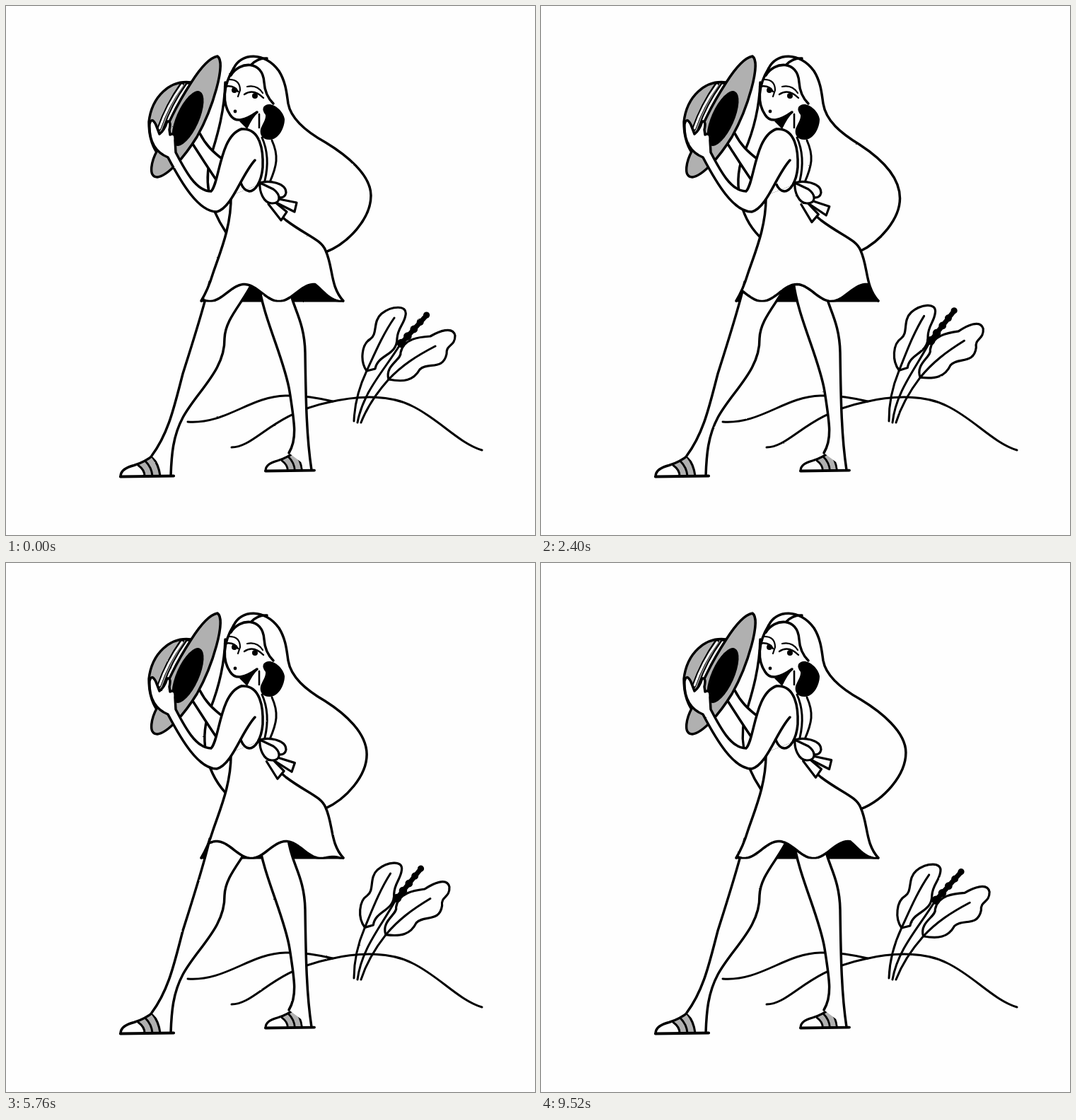
Write an HTML page that moves like this. It is 748 by 748 pixels and loops after 9.6 s.

```html
<!DOCTYPE html>
<html lang="en">
<head>
<meta charset="utf-8">
<title>Windy walk</title>
<style>
html, body { margin: 0; width: 100%; height: 100%; overflow: hidden; background: #fefefe; }
svg { display: block; width: 100vw; height: 100vh; }
</style>
</head>
<body>
<svg viewBox="0 0 748 748">
  <defs>
    <filter id="rough" filterUnits="userSpaceOnUse" x="140" y="50" width="560" height="640" color-interpolation-filters="sRGB">
      <feTurbulence id="grain" type="fractalNoise" baseFrequency="0.4" numOctaves="1" result="n"/>
      <feDisplacementMap in="SourceGraphic" in2="n" scale="1.6" xChannelSelector="R" yChannelSelector="G"/>
    </filter>
    <clipPath id="skirtClip"><path id="clipShape"/></clipPath>
  </defs>
  <g id="art" filter="url(#rough)" fill="none" stroke="#000" stroke-width="3.5" stroke-linecap="round" stroke-linejoin="round"></g>
</svg>
<script>
const INK = '#000', PAPER = '#fefefe', GRAY = '#b0b0b0';
const LOOP = 9600, STEP = 80, SWAY = 3200, TAU = 2 * Math.PI;
const $ = id => document.getElementById(id);
const art = $('art');

function add(tag, attrs, parent = art) {
  const el = document.createElementNS('http://www.w3.org/2000/svg', tag);
  for (const k in attrs) el.setAttribute(k, attrs[k]);
  return parent.appendChild(el);
}
const line = (d, w = 3.5, parent) => add('path', { d, 'stroke-width': w }, parent);
const shape = (d, fill = PAPER, w = 3.5, parent) => add('path', { d, fill, 'stroke-width': w }, parent);
const solid = (d, fill = INK, parent) => add('path', { d, fill, stroke: 'none' }, parent);
const dot = (cx, cy, r, parent) => add('circle', { cx, cy, r, fill: INK, stroke: 'none' }, parent);

// Hills
line('M257,588C310,592 345,552 395,551Q425,550 462,559', 3);
line('M319,624C352,624 375,577 458,560C500,550 545,550 575,566C612,584 640,618 673,628', 3);

// Plant: each part turns about its own foot
const plantPart = (x, y, amp, lag) => ({ x, y, amp, lag, g: add('g', { 'stroke-width': 3.2 }) });
const leafA = plantPart(492, 587, 2.45, .03);
const leafB = plantPart(502, 589, 3.1, .14);
const spike = plantPart(497, 589, 2.9, .07);
const plant = [leafA, leafB, spike];

shape('M510,516C500,502 503,478 515,471C526,464 518,446 531,435C545,424 568,422 565,437C563,450 554,455 553,470C553,495 526,492 522,513Z', PAPER, 3.2, leafA.g);
line('M492,587C493,560 501,535 510,516C522,490 533,464 549,441', 3, leafA.g);
shape('M541,528C535,508 560,500 558,490C562,470 585,468 600,467C612,460 632,452 635,466C635,482 622,478 623,492C618,516 596,503 585,514C576,530 562,532 541,528Z', PAPER, 3.2, leafB.g);
line('M502,589C511,566 525,546 541,528C560,508 580,495 607,481', 3, leafB.g);
line('M497,589C505,545 535,515 557,479', 3, spike.g);
line('M558,478L594,438', 7, spike.g);
for (let i = 0; i < 5; i++) dot(559 + i * 8.9, 477 - i * 10, 6.2 - i * .4, spike.g);

// Hair
const hairR = line(''), hairL = line('');

// k: 0 blown out, 1 hanging closer
function drawHair(k) {
  const p = (x, y, dx, dy) => `${x + dx * k},${y + dy * k} `;
  hairR.setAttribute('d', 'M322,88C332,66 366,64 386,92C396,108 397,125 399,138C' +
    p(403, 160, 0, 5) + p(425, 178, -3, 3) + p(452, 193, -3, 6) +
    p(480, 210, -2, 9) + p(516, 238, -17, 6) + p(516, 268, -17, 8) +
    p(516, 300, -17, 2) + p(485, 335, -11, -3) + p(452, 348, -3, -2));
  hairL.setAttribute('d', 'M310,108C' +
    p(309, 150, -1, 0) + p(298, 185, -1, -3) + p(292, 205, -8, 1) +
    p(278, 245, -16, 3) + p(286, 282, -12, 30) + p(311, 320, -4, 12));
}

// Far arm
shape('M262,192C275,212 285,228 298,247L308,218C292,206 282,196 274,180');

// Skirt back
const skirt = 'M318,268C319,312 302,350 292,380Q286,400 275,418.5H478C458,396 463,370 452,346C446,330 425,325 396,303Q363,276 359,252Z';
$('clipShape').setAttribute('d', skirt);
solid(skirt);

// Sandals
function sandal(x, y, k) {
  const g = add('g', { transform: `translate(${x} ${y}) scale(${k})` });
  solid('M24,-16L45,-29Q57,-18 57,-1H33Q32,-9 24,-16Z', GRAY, g);
  line('M0,0C0,-9 8,-13 19,-16Q35,-21 47,-31', 3.5, g);
  for (let i = 0; i < 3; i++) {
    const bx = 25 + i * 10, by = -16 - i * 6;
    line(`M${bx},${by}Q${bx + 9},${by * .6} ${bx + 9 + i},-1`, 3, g);
  }
  line('M0,0L75,-1', 4.2, g);
}
sandal(162, 665.5, 1);
sandal(367, 657.5, .92);

// Legs
shape('M206,636C230,604 238,566 250,520C262,482 282,420 288,390H349C335,420 310,442 309,470C310,515 270,545 250,582C236,608 234,635 233,664');
shape('M400,632C412,612 408,590 401,545C394,500 363,440 357,390H399C403,425 422,442 423,490C424,560 425,610 432,656');

// Skirt front with a travelling hem
const hem = shape('', PAPER, 3.5, add('g', { 'clip-path': 'url(#skirtClip)' }));
line('M318,268C319,312 302,350 292,380Q286,400 276,417');
line('M359,252Q363,276 396,303C425,325 446,330 452,346C463,370 458,396 477,417');

const WAVE = 98, TROUGH = 288;
function drawHem(u) {
  const tip = Math.max(0, Math.sin(TAU * u));
  let d = 'M260,240';
  for (let x = 260; x <= 490; x += 3) {
    const lift = 12 * (1 - Math.cos((x - TROUGH - WAVE * u) / WAVE * TAU));
    const e = Math.min(1, Math.max(0, (x - 437) / 36));
    d += `L${x},${(417.5 - lift * (1 - e + e * tip)).toFixed(2)}`;
  }
  hem.setAttribute('d', d + 'V240Z');
}

// Back
line('M362,186Q374,213 366,247', 3);
line('M376,190C386,212 383,226 373,249', 3);

// Bow
const ribbons = add('g', {});
shape('M371,280L389,303L397,291L380,277', PAPER, 3.2, ribbons);
shape('M386,273L411,278L408,291L384,279', PAPER, 3.2, ribbons);
shape('M359,250C372,246 396,250 396,264C394,274 382,272 377,264Z', PAPER, 3.2);
shape('M359,250C358,262 364,279 376,279C388,279 390,268 378,259Z', PAPER, 3.2);

// Head
solid('M322,90C345,74 365,90 373,136L340,162Q312,160 310,122Z', PAPER);
line('M322,88C306,114 306,138 317,154Q327,170 355,150');
line('M318,98C330,78 363,76 365,108Q366,126 378,138');
line('M347,83Q356,73 369,74');
solid('M330,163L357,150Q349,157 341,174Z');
line('M358,153V172', 2.6);
solid('M364,143C372,132 392,146 394,160C394,172 386,188 374,189C364,190 358,183 360,174C362,168 368,160 367,154Q362,148 364,143Z');

line('M316,104Q331,104 331,119L328,128', 2.2);
line('M309,114Q322,111 328,121', 2.4);
line('M341,114Q355,111 363,123', 2.2);
line('M337,125Q350,116 364,130', 2.4);
dot(323, 119, 4);
dot(352, 127, 4);
dot(324, 149, 2.4);

// Hat
shape('M262,108C232,104 206,128 202,164Q202,190 213,207L240,165Z', GRAY);
for (const x of [0, 8]) {
  line(`M${249 + x},110Q${228 + x},140 ${216 + x},174`, 6);
  add('path', { d: `M${249 + x},112Q${228 + x},141 ${217 + x},173`, stroke: PAPER, 'stroke-width': 3 });
}
shape('M299,71C312,80 292,146 270,185C252,214 229,240 214,242C200,242 206,218 214,204C228,168 240,142 262,108C276,86 288,73 299,71Z', GRAY);
add('ellipse', { rx: 16, ry: 42, transform: 'translate(257 159) rotate(24)', fill: INK, stroke: 'none' });

// Near arm and sleeve
shape('M352,218C332,240 320,285 298,291C272,291 248,250 229,214C210,206 202,190 203,167Q206,156 212,168L217,181Q224,176 228,163Q234,162 231,175L232,182Q240,178 239,190L240,207C252,230 268,262 290,262C302,250 302,184 333,174');
line('M333,174C360,172 364,205 363,228C361,250 352,262 344,262Q336,261 332,250');

function draw(frame) {
  const t = frame * STEP;
  const swing = lag => Math.cos((t / SWAY - lag) * TAU);
  drawHair((1 - swing(0)) / 2);
  drawHem(t / LOOP);
  for (const { g, x, y, amp, lag } of plant) {
    const turn = amp * (swing(lag) - Math.cos(lag * TAU));
    g.setAttribute('transform', `rotate(${turn.toFixed(3)} ${x} ${y})`);
  }
  ribbons.setAttribute('transform', `rotate(${(3 - 5 * swing(.15)).toFixed(3)} 365 255)`);
  $('grain').setAttribute('seed', frame + 1);
}

const start = performance.now();
let last = -1;
function tick() {
  const frame = Math.floor(((performance.now() - start) % LOOP) / STEP);
  if (frame !== last) draw(last = frame);
  requestAnimationFrame(tick);
}
tick();
</script>
</body>
</html>
```
